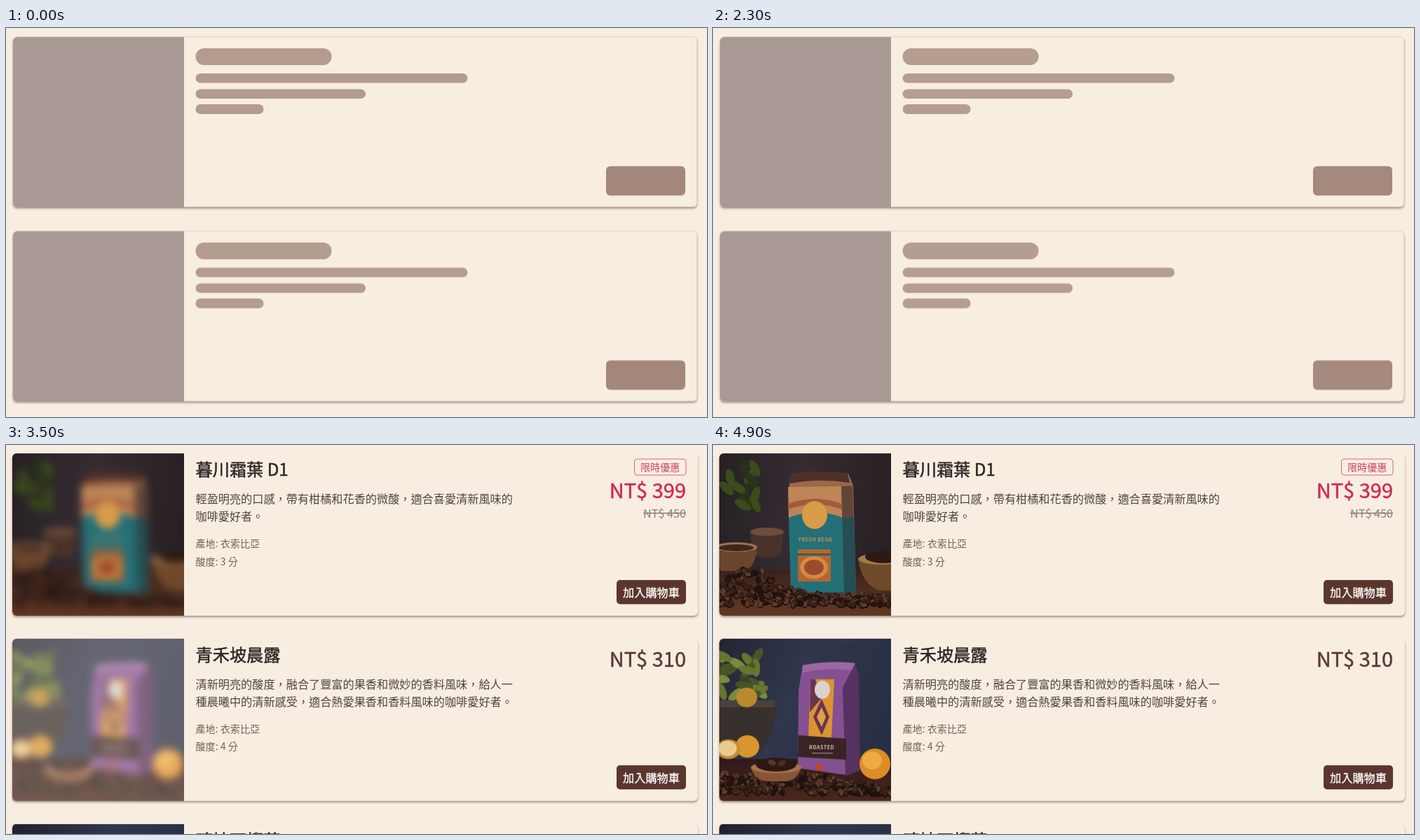
Write an HTML page that moves like this. It is 1000 px wide and 556 px high and loops after 5000 ms.

```html
<!DOCTYPE html>
<html lang="zh-Hant-TW">
<head>
<meta charset="utf-8">
<title>Coffee list loading</title>
<style>
html, body { margin: 0; width: 100%; height: 100%; overflow: hidden; background: #f8ede1; }
svg { display: block; width: 100%; height: 100%; }
text { font-family: 'Noto Sans CJK TC', 'Noto Sans TC', 'Noto Sans CJK JP', 'Noto Sans CJK', sans-serif; }
.card { fill: #f8ede1; filter: drop-shadow(0 2px 1.5px rgba(70, 55, 45, .5)); }
.edge { fill: none; stroke: rgba(90, 75, 65, .14); }
.bar, .block { fill: #a3877a; }
.title, .price { font-weight: 500; stroke-width: .5px; }
.title { font-size: 24.2px; fill: #2b2626; stroke: #2b2626; }
.price { font-size: 29px; fill: #5b3b33; stroke: #5b3b33; }
.sale { fill: #d0294f; stroke: #d0294f; }
.old { font-size: 16.2px; fill: #8b817a; text-decoration: line-through; }
.desc { font-size: 16.17px; fill: #4d4542; }
.note { font-size: 14.1px; fill: #775d56; }
.tag { font-size: 14.1px; fill: #cc4462; }
.buy { font-size: 16.2px; font-weight: 500; fill: #fff; stroke: #fff; stroke-width: .3px; }
.soft { filter: blur(6px); }
.tiny { font-size: 7px; font-weight: 700; letter-spacing: .5px; }
.end { text-anchor: end; }
.mid { text-anchor: middle; }
</style>
</head>
<body>
<svg id="stage" viewBox="0 0 1000 556"></svg>
<script>
const LOOP = 5000, SWAP = 3200;

const rect = (x, y, w, h, fill, r = 0) =>
  `<rect x="${x}" y="${y}" width="${w}" height="${h}" rx="${r}" fill="${fill}"/>`;
const oval = (x, y, rx, ry, fill, turn = 0) =>
  `<ellipse cx="${x}" cy="${y}" rx="${rx}" ry="${ry}" fill="${fill}" transform="rotate(${turn} ${x} ${y})"/>`;
const path = (d, fill) => `<path d="${d}" fill="${fill}"/>`;
const text = (cls, x, y, s) => `<text class="${cls}" x="${x}" y="${y}">${s}</text>`;
const shift = (y, body) => `<g transform="translate(0 ${y})">${body}</g>`;

function random(seed) {
  return () => (seed = (seed * 16807) % 2147483647) / 2147483647;
}

// Beans between a heap outline top(x) and a lower edge, back to front
function beans(seed, count, top, low) {
  const rnd = random(seed), tones = ['#24140f', '#3a221a', '#4a2e24', '#5c3d30'];
  return Array.from({ length: count }, () => {
    const x = rnd() * 245, y = top(x) + rnd() * (low - top(x));
    return { x, y, turn: rnd() * 180, tone: tones[Math.floor(rnd() * 4)] };
  }).sort((a, b) => a.y - b.y).map(b =>
    oval(b.x.toFixed(1), b.y.toFixed(1), 5.2, 3.6, '#1a0e0b', b.turn.toFixed(0)) +
    oval(b.x.toFixed(1), (b.y - .8).toFixed(1), 4.3, 2.7, b.tone, b.turn.toFixed(0))).join('');
}

function leaves(seed, count, cx, cy, tones) {
  const rnd = random(seed);
  return Array.from({ length: count }, () => oval(
    (cx + (rnd() - .5) * 70).toFixed(1), (cy + (rnd() - .5) * 60).toFixed(1), 13, 6,
    tones[Math.floor(rnd() * tones.length)], (rnd() * 180).toFixed(0))).join('');
}

function tealBag() {
  return rect(-30, -30, 305, 292, 'url(#dusk)') +
    leaves(7, 16, 22, 48, ['#2c3418', '#3c4a1c', '#26301a']) +
    rect(-30, 166, 305, 96, 'url(#wood)') +
    path('M44 112h48l-4 32q-20 10-40 0z', '#493329') + oval(68, 112, 24, 6, '#6b4d3c') +
    path('M-10 134h64q-2 32-22 34h-30z', '#6a442d') + oval(24, 134, 30, 7, '#9a7150') + oval(24, 135, 25, 5, '#3d281e') +
    path('M198 150h60v46h-30q-26-10-30-46z', '#70492b') + oval(232, 151, 34, 8, '#a47a48') + oval(234, 148, 26, 9, '#2d1a14') +
    path('M100 44L103 30Q145 24 184 29L191 46 195 198 180 204 102 196Z', '#9b6849') +
    path('M101 43Q100 31 104 28 145 23 183 29L186 42Q142 35 101 43Z', '#4d3028') +
    path('M98 48L174 47 176 92 99 92Z', '#bd8558') +
    path('M99 92Q137 76 176 92L178 202 102 196Z', '#237078') +
    path('M174 47L190 46 195 198 178 203Z', '#5f4638') +
    path('M176 92L192 92 195 198 178 203Z', '#244e53') +
    path('M98 72Q137 58 175 72V80Q137 66 98 80Z', '#a25b3d') +
    oval(136, 88, 18, 20, '#d99b48') +
    text('tiny mid" fill="#c58d45', 137, 126, 'FRESH BEAN') +
    rect(112, 137, 47, 46, '#b5662f', 2) + rect(112, 143, 47, 3, '#325f60') +
    oval(135, 163, 20, 16, '#d28b45') + oval(135, 163, 14, 11, '#9d4c2b') +
    beans(41, 310, x => x < 75 ? 187 - 24 * Math.sin(x / 75 * 2.6) : 188 + Math.min(14, (x - 75) * .2), 218);
}

function purpleBag() {
  return rect(-30, -30, 305, 292, 'url(#night)') +
    leaves(19, 26, 24, 52, ['#46552a', '#66752f', '#34432a', '#7d8a3c']) +
    path('M-20 88H80q2 44-20 70H-20z', '#37302d') + rect(-20, 88, 100, 10, '#4a413c', 4) +
    oval(39, 84, 15, 14, '#b88a2d') +
    rect(-30, 172, 305, 90, 'url(#plum)') +
    oval(40, 154, 17, 16, '#d9962e') + oval(13, 158, 17, 14, '#c98a36') + oval(12, 157, 13, 11, '#ecca8d') +
    path('M119 38Q156 31 194 35L190 56 201 188 182 195 112 185 113 74Z', '#855091') +
    path('M119 38Q156 31 194 35L192 46Q155 40 118 49Z', '#9b68a2') +
    path('M194 35L199 52 201 188 180 195 176 70Z', '#57315f') +
    path('M130 58L164 58 160 142 127 141Z', '#db942f') +
    path('M146 86L157 112 146 138 134 112Z', '#673553') + path('M146 98L152 112 146 126 139 112Z', '#e2a144') +
    path('M130 58L137 58 145 86 129 105Z', '#673553') +
    oval(147, 73, 11, 13, '#d9d2cf') +
    path('M113 138L181 143 181 173 112 169Z', '#392326') +
    text('tiny mid" fill="#d9c0a4', 146, 158, 'ROASTED') +
    rect(132, 163, 30, 1.2, '#a98973') + rect(138, 179, 9, 10, '#b94730') +
    oval(222, 179, 22, 22, '#dc8d25') + oval(218, 174, 14, 13, '#edab42') +
    beans(83, 250, x => x < 130 ? 190 + Math.abs(x - 60) * .05 : 192 + (x - 130) * .17, 222) +
    path('M45 184h72q-6 20-24 20H68q-18-2-23-20z', '#875536') + oval(81, 184, 36, 8, '#a9744c') +
    oval(81, 180, 29, 10, '#2d1913') + oval(75, 177, 6, 4, '#53372b', 20) + oval(89, 178, 6, 4, '#49301f', -30);
}

function darkTop() {
  return rect(0, 0, 245, 232, 'url(#night)');
}

const stop = (at, c) => `<stop offset="${at}" stop-color="${c}"/>`;
const grad = (id, a, b, c, dir = 'x2="0" y2="1"') =>
  `<linearGradient id="${id}" ${dir}>${stop(0, a)}${stop(.5, b)}${stop(1, c)}</linearGradient>`;

const defs = `<defs>
  <clipPath id="pic"><path d="M245 0H6a6 6 0 0 0-6 6V226a6 6 0 0 0 6 6H245z"/></clipPath>` +
  grad('dusk', '#231d21', '#342c32', '#261e22', 'x2="1" y2=".1"') +
  grad('night', '#20212c', '#30364c', '#282e43', 'x2="1" y2=".4"') +
  grad('wood', '#38211c', '#5c3322', '#69391f') +
  grad('plum', '#30191b', '#46241d', '#4f2a20') + '</defs>';

const bar = (y, w, h) => `<rect class="bar" x="270.5" y="${y}" width="${w}" height="${h}" rx="${h / 2}"/>`;
const skeleton = y => shift(y,
  '<rect class="card" x="10" y="13" width="976" height="243" rx="6"/>' +
  '<rect class="edge" x="10.5" y="12.5" width="975" height="243" rx="6"/>' +
  '<path class="shot" d="M254 13H16a6 6 0 0 0-6 6V250a6 6 0 0 0 6 6H254z"/>' +
  bar(29, 194, 24) + bar(65, 388, 13.6) + bar(87.5, 242.5, 13.6) + bar(109, 97, 14) +
  '<rect class="block" x="856" y="197.5" width="113" height="42" rx="6"/>');

function product(y, p) {
  const photo = p.soft
    ? `<g class="soft ${p.id}">${p.draw()}</g><g class="sharp ${p.id}">${p.draw()}</g>` : p.draw();
  const price = p.old
    ? '<rect x="896.5" y="20" width="73.5" height="23" rx="4" fill="none" stroke="#d3677f"/>' +
      text('tag mid', 933.2, 36.7, '限時優惠') +
      text('price sale end', 970, 75.5, p.price) + text('old end', 970, 103.8, p.old)
    : text('price end', 970, 52, p.price);
  return shift(y,
    '<rect class="card" x="9" y="12" width="978" height="232" rx="6"/>' +
    `<g transform="translate(9 12)" clip-path="url(#pic)">${photo}</g>` +
    text('title', 270.5, 44.3, p.name) +
    p.desc.map((s, i) => text('desc', 270.5, 83 + i * 24.8, s)).join('') +
    text('note', 270.5, 146, '產地: 衣索比亞') + text('note', 270.5, 171.5, `酸度: ${p.acid} 分`) +
    price + rect(871, 193, 99, 34.5, '#5b362f', 5) + text('buy mid', 920.5, 216.8, '加入購物車'));
}

const list = [
  { id: 'teal', soft: true, draw: tealBag, name: '暮川霜葉 D1', acid: 3, price: 'NT$ 399', old: 'NT$ 450',
    desc: ['輕盈明亮的口感，帶有柑橘和花香的微酸，適合喜愛清新風味的', '咖啡愛好者。'] },
  { id: 'purple', soft: true, draw: purpleBag, name: '青禾坡晨露', acid: 4, price: 'NT$ 310',
    desc: ['清新明亮的酸度，融合了豐富的果香和微妙的香料風味，給人一', '種晨曦中的清新感受，適合熱愛果香和香料風味的咖啡愛好者。'] },
  { id: 'next', draw: darkTop, name: '晴坡石榴莓', acid: 3, price: 'NT$ 330', desc: [] }
];

document.getElementById('stage').innerHTML = defs +
  `<g id="wait">${skeleton(0)}${skeleton(277.6)}</g>` +
  `<g id="ready">${list.map((p, i) => product(i * 264.8, p)).join('')}</g>`;

// steps: [ms, value, easing to the next step]
function play(selector, prop, steps) {
  const frames = steps.map(([ms, value, easing = 'linear']) => ({ offset: ms / LOOP, [prop]: value, easing }));
  frames.unshift({ offset: 0, [prop]: steps[0][1] });
  frames.push({ offset: 1, [prop]: steps[steps.length - 1][1] });
  for (const el of document.querySelectorAll(selector)) {
    el.animate(frames, { duration: LOOP, iterations: Infinity }).startTime = 0;
  }
}

const pulse = (high, low) => [450, 1450, 2450, 3450].map((ms, i) => [ms, i % 2 ? low : high, 'ease-in-out']);
play('.block', 'opacity', pulse(1, .4));
play('.bar', 'opacity', pulse(.8, .4));
play('.shot', 'fill', pulse('#a99a95', '#ad9a97'));

play('#wait', 'opacity', [[SWAP, 1, 'step-end'], [SWAP, 0]]);
play('#ready', 'opacity', [[SWAP, 0, 'step-end'], [SWAP, 1]]);

for (const [id, t] of [['teal', 3600], ['purple', 3350]]) {
  play(`.soft.${id}`, 'opacity', [[t, 1], [t + 200, .65], [t + 450, 0]]);
  play(`.sharp.${id}`, 'opacity', [[t + 180, 0], [t + 450, .88], [t + 700, .94], [t + 1200, 1]]);
}
</script>
</body>
</html>
```
